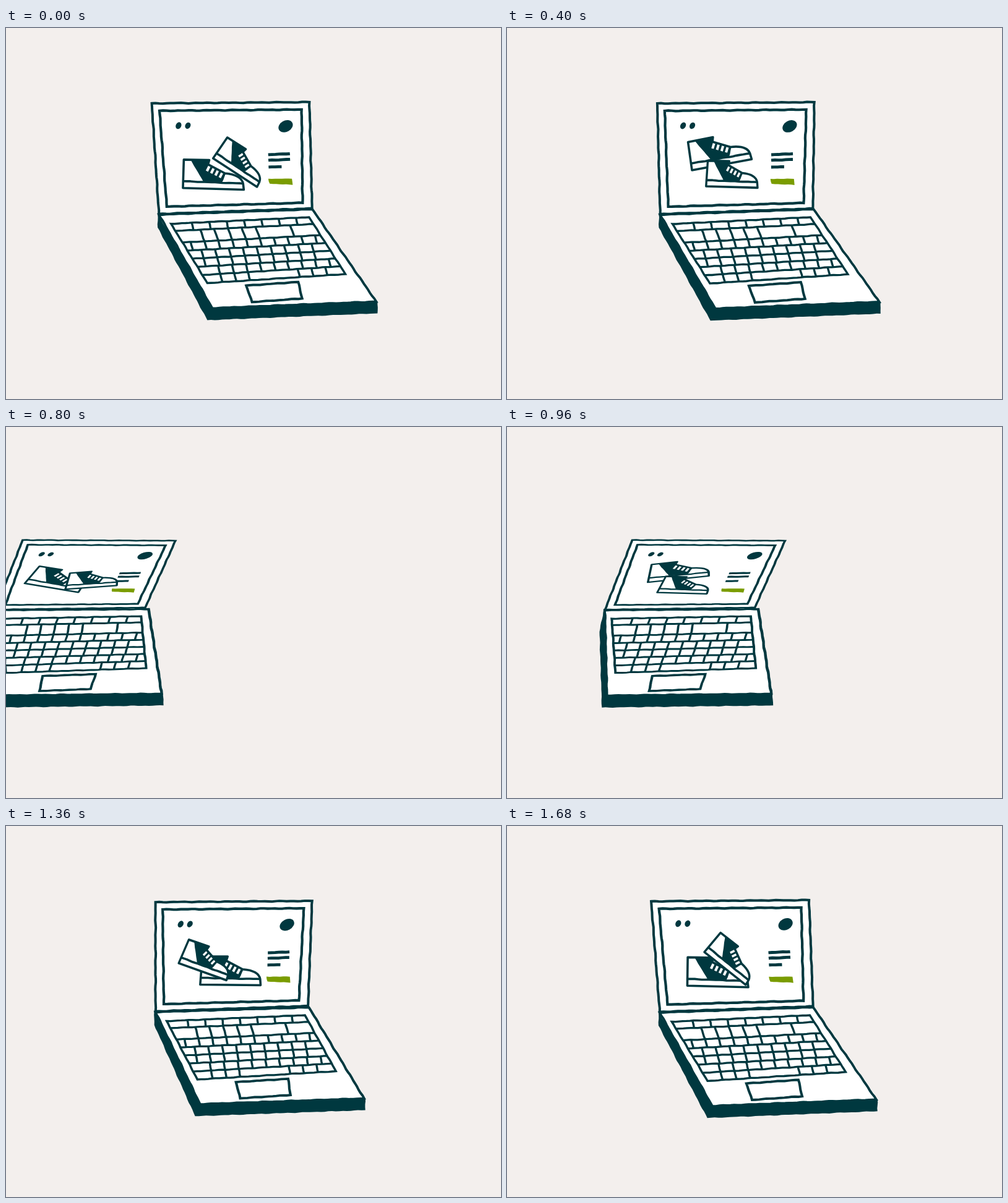
An HTML page with a canvas for the animation above (1.76 s loop, 800 px wide and 600 px high).

```html
<!DOCTYPE html>
<html lang="en">
<head>
<meta charset="utf-8">
<title>Laptop</title>
<style>
html, body { margin: 0; width: 100%; height: 100%; overflow: hidden; background: #f3efed; }
canvas { display: block; width: 800px; height: 600px; }
</style>
</head>
<body>
<canvas id="stage" width="800" height="600"></canvas>
<script>
const ctx = document.getElementById('stage').getContext('2d');
const INK = '#00383f', PAPER = '#ffffff', GREEN = '#7a9c00', BG = '#f3efed';
const STEP = 80, STEPS = 22, GAIT = 15;

// Walk cycle: phase, heel x, heel y, angle in degrees
const FAR_SHOE = [
  [0, 299, 230, -11], [3, 324, 244, -9], [5, 319, 257, 0],
  [10, 288, 259, 1], [12.5, 272, 234, 18]
];
const NEAR_SHOE = [
  [0, 322, 256, 1], [3, 271, 256, 1], [5, 283, 222, 19],
  [9, 324, 204, 39], [10, 338, 211, 33], [13, 349, 247, -8]
];

const mix = (a, b, t) => a + (b - a) * t;
const run = (from, count, gap = .1) => Array.from({ length: count }, (_, i) => from + i * gap);

// Key joints, one run per row; the gaps hold the wide keys
const KEYS = [
  run(.14, 7, .126),
  [...run(.17, 5), .82],
  run(.05, 10),
  run(.09, 9),
  run(.07, 9),
  run(.14, 9),
  [...run(.12, 3), ...run(.68, 3)]
];
const rowTop = i => i < 2 ? .12 * i : .315 + (i - 2) * .137;

function gait(keys, phase) {
  const i = keys.findLastIndex(k => k[0] <= phase);
  const a = keys[i], b = keys[i + 1] || [GAIT, ...keys[0].slice(1)];
  const t = (phase - a[0]) / (b[0] - a[0]);
  return a.slice(1).map((v, n) => mix(v, b[n + 1], t));
}

// Adds a slightly uneven, hand-inked edge to the current path
function edge([x0, y0], [x1, y1], amp) {
  const dx = x1 - x0, dy = y1 - y0, len = Math.hypot(dx, dy) || 1;
  const n = Math.ceil(len / 6), seed = x0 * .7 + y0 * .3;
  for (let i = 1; i <= n; i++) {
    const t = i / n;
    const off = i < n ? amp * (Math.sin(i * .9 + seed) + Math.sin(i * 1.7 + seed * 2)) / 2 : 0;
    ctx.lineTo(x0 + dx * t - dy / len * off, y0 + dy * t + dx / len * off);
  }
}

function shape(pts, { fill, width, amp = .55, open } = {}) {
  ctx.beginPath();
  ctx.moveTo(...pts[0]);
  for (let i = 1; i < pts.length; i++) edge(pts[i - 1], pts[i], amp);
  if (!open) {
    edge(pts[pts.length - 1], pts[0], amp);
    ctx.closePath();
  }
  if (fill) { ctx.fillStyle = fill; ctx.fill(); }
  if (width) { ctx.lineWidth = width; ctx.stroke(); }
}

const line = (a, b, width, amp = .4) => shape([a, b], { width, amp, open: true });

function blob(x, y, rx, ry, angle) {
  ctx.beginPath();
  ctx.ellipse(x, y, rx, ry, angle, 0, Math.PI * 2);
  ctx.fillStyle = INK;
  ctx.fill();
}

function shoe([x, y, angle], sx, sy) {
  ctx.save();
  ctx.translate(x, y);
  ctx.rotate(angle * Math.PI / 180);
  ctx.scale(sx, sy);
  ctx.lineJoin = 'round';
  const w = 3.6 / sy;

  const outline = new Path2D(
    'M2-46L43-46L41-39L68-25Q94-23 97-9L98 1L0 0Z');
  ctx.fillStyle = PAPER;
  ctx.fill(outline);
  shape([[13, -46], [43, -46], [41, -39], [69, -24], [63, -10], [33, -11]], { fill: INK, amp: .4 });
  ctx.strokeStyle = PAPER;
  for (let i = 0; i < 4; i++) {
    const lx = 43 + i * 6.8, ly = -36 + i * 3.4;
    line([lx, ly], [lx - 4, ly + 8], 4, 0);
  }
  ctx.strokeStyle = INK;
  ctx.lineWidth = w;
  ctx.stroke(outline);
  line([1, -11], [97, -9], w);
  ctx.restore();
}

function lid(h, hy, lean, height, phase) {
  const s = height / 180, c = -lean / 180, k = .026 * (1 - s);
  const a = 1 - .0006 * lean;
  ctx.save();
  ctx.transform(a, k, c, s, h - 248 * a - 301 * c, hy - 248 * k - 301 * s);
  shape([[242, 122], [496, 120], [495, 292], [248, 301]], { fill: PAPER, width: 4 });
  shape([[254, 134], [483, 132], [480, 283], [261, 289]], { width: 4.2 });

  blob(284, 158, 4.3, 5.8, .5);
  blob(299, 158, 4.2, 5.5, .55);
  blob(456.5, 159, 12.3, 9, -.5);
  line([427, 205], [462, 203.5], 4.8);
  line([427, 214], [462, 212.5], 4.8);
  line([427, 225], [448, 224.5], 4.8);
  shape([[426, 244], [464, 244], [465, 254], [428, 252]], { fill: GREEN });

  shoe(gait(FAR_SHOE, phase), 1, 1);
  shoe(gait(NEAR_SHOE, phase), .85, .9);
  ctx.restore();
}

function keyPoint(u, v) {
  const x = mix(268, 329, v) + 223 * u;
  return [x, mix(mix(317, 414, v), mix(306, 399, v), u)];
}

function keyboard() {
  shape([[0, 0], [1, 0], [1, 1], [0, 1]].map(p => keyPoint(...p)), { width: 3.4, amp: .45 });
  KEYS.forEach((row, i) => {
    const top = rowTop(i), bottom = rowTop(i + 1);
    if (i) line(keyPoint(0, top), keyPoint(1, top), 3.3);
    row.forEach(u => line(keyPoint(u + .01, top), keyPoint(u - .01, bottom), 3.4));
  });
}

function base(h, hy, lean) {
  const c = (lean - 90) / 157, a = 1 + c * .036;
  const k = (90 - lean) * .0003;
  const d = (138.5 + .16 * lean - 90 * k) / 154;
  const place = (x, y) => [
    h + a * (x - 248) + c * (y - 301),
    hy + k * (x - 248) + d * (y - 301)
  ];
  const fl = place(338, 455), fr = place(604, 444);
  const g = Math.max(0, (50 - lean) / 47);
  shape([
    [h - 2, hy], [h - 2 - 7 * g, hy + 22 + 14 * g],
    [fl[0] - 8, fl[1] + 19.5], [fr[0] + 1 + g, fr[1] + 19],
    [fr[0] + 1, fr[1]], fl
  ], { fill: INK });

  ctx.save();
  ctx.transform(a, k, c, d, h - 248 * a - 301 * c, hy - 248 * k - 301 * d);
  shape([[248, 302], [496, 293], [603, 444], [338, 455]], { fill: PAPER, width: 3.8 });
  keyboard();
  shape([[392, 418], [476, 412], [483, 439], [402, 445]], { width: 4, amp: .45 });
  ctx.restore();
}

// Slides in from the left, springs upright, then speeds off to the right
function draw(step) {
  const age = (step + 12) % STEPS - 2;
  const settle = Math.max(age, 0);
  const h = 247.5 - 89 * .58 ** age + 6 * Math.max(0, age - 15) ** 3;
  const lean = 90 - 87 * .73 ** settle;
  const lidLean = 85 * Math.exp(-.265 * settle) * Math.cos(settle * Math.PI / 7 - .94);
  const height = 180 - 67 * .51 ** settle;
  const hy = 295 + .067 * lean;

  ctx.fillStyle = BG;
  ctx.fillRect(0, 0, 800, 600);
  ctx.strokeStyle = INK;
  lid(h, hy, lidLean, height, (age + GAIT) % GAIT);
  base(h, hy, lean);
}

let last = -1;
function tick() {
  const step = Math.floor(performance.now() / STEP) % STEPS;
  if (step !== last) draw(last = step);
  requestAnimationFrame(tick);
}
tick();
</script>
</body>
</html>
```
